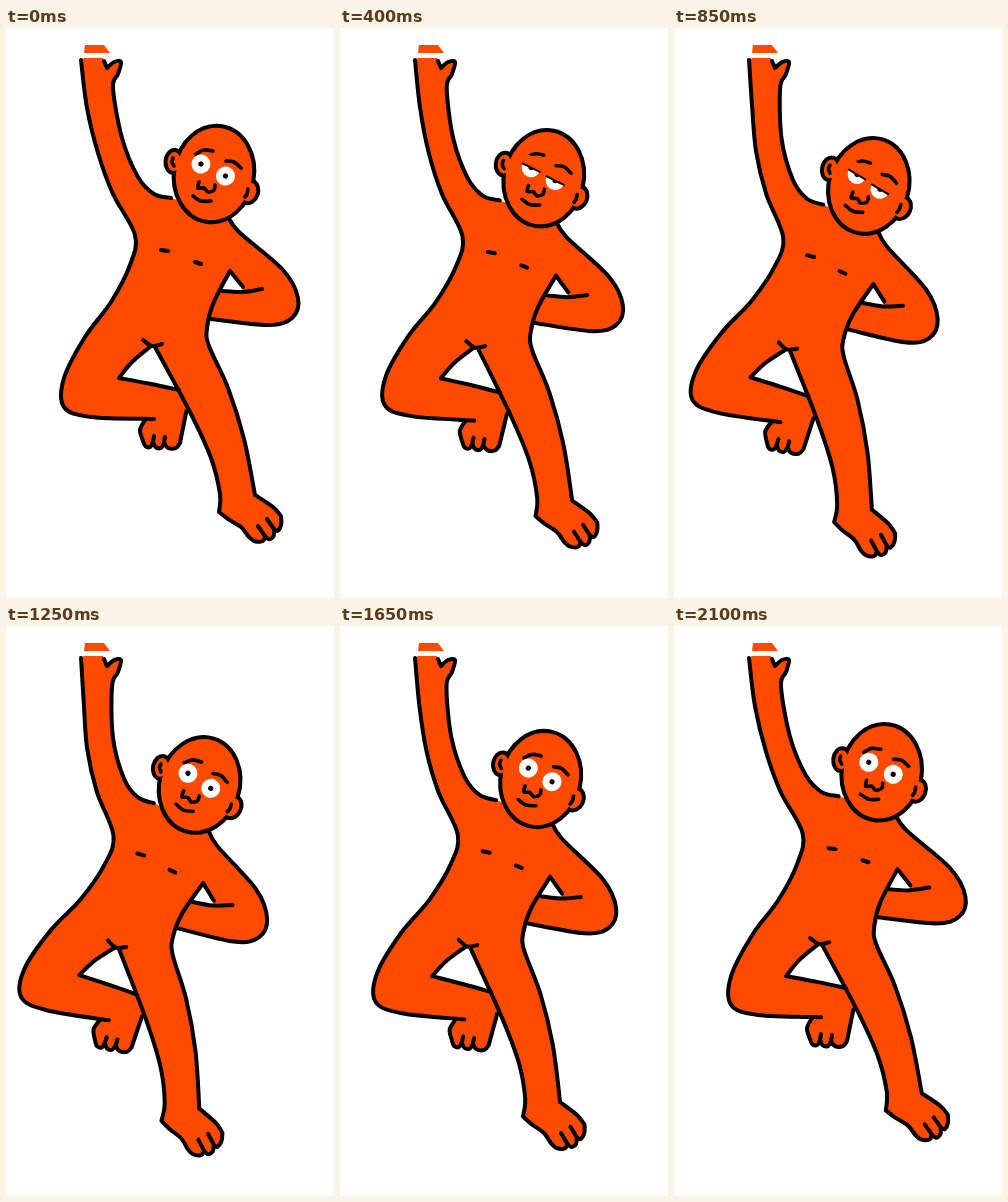
An HTML page with a canvas for the animation above (2.15 s loop, 328 by 570 pixels).

```html
<!DOCTYPE html>
<html lang="en">
<head>
<meta charset="utf-8">
<title>Swinging figure</title>
<style>
html, body { margin: 0; width: 100%; height: 100%; overflow: hidden; background: #fff; }
canvas { display: block; width: 328px; height: 570px; }
</style>
</head>
<body>
<canvas id="stage" width="328" height="570"></canvas>
<script>
const ctx = document.getElementById("stage").getContext("2d");
const ORANGE = "#ff4a00", INK = "#000";
const LOOP = 2150, STEP = 50, SWING = 2200;
const PIVOT = { x: 100, y: 40 }, MAX_ANGLE = 0.134;
const TAU = Math.PI * 2;

let angle = 0;

const ramp = (v, from, to) => Math.max(0, Math.min(1, (v - from) / (to - from)));

// The body hangs from the hand: full rotation below the elbow, none at the wrist.
function swing([x, y]) {
  const a = angle * ramp(y, 30, 110);
  const dx = x - PIVOT.x, dy = y - PIVOT.y, c = Math.cos(a), s = Math.sin(a);
  return [PIVOT.x + dx * c - dy * s, PIVOT.y + dx * s + dy * c];
}

// Smooth curve through the points, appended to the current path.
function curve(pts, join) {
  const at = i => pts[Math.max(0, Math.min(pts.length - 1, i))];
  if (join) ctx.lineTo(...pts[0]); else ctx.moveTo(...pts[0]);
  for (let i = 0; i < pts.length - 1; i++) {
    const a = at(i - 1), b = at(i), c = at(i + 1), d = at(i + 2);
    ctx.bezierCurveTo(b[0] + (c[0] - a[0]) / 6, b[1] + (c[1] - a[1]) / 6,
      c[0] - (d[0] - b[0]) / 6, c[1] - (d[1] - b[1]) / 6, c[0], c[1]);
  }
}

function fill(...parts) {
  ctx.beginPath();
  parts.forEach((part, i) => curve(part.map(swing), i > 0));
  ctx.fillStyle = ORANGE;
  ctx.fill();
}

function ink(...parts) {
  ctx.beginPath();
  parts.forEach(part => curve(part.map(swing)));
  ctx.stroke();
}

const back = pts => pts.slice().reverse();
const add = (p, v) => [p[0] + v[0], p[1] + v[1]];
const mix = (a, b, k) => [a[0] + (b[0] - a[0]) * k, a[1] + (b[1] - a[1]) * k];

// One rounded bump between each pair of joints, and a slit at each inner joint.
function toes(joints, bulge, slit) {
  const bumps = joints.slice(1).map((b, i) => {
    const a = joints[i];
    return [a, add(mix(a, b, 0.25), bulge), add(mix(a, b, 0.75), bulge), b];
  });
  const slits = joints.slice(1, -1).map(j => [j, add(j, slit)]);
  return { bumps, slits };
}

function drawArm() {
  const arm = [[221, 187], [233, 204], [277, 242], [292, 270], [286, 290], [262, 297], [205, 291]];
  const elbow = [[224, 243], [237, 259]];
  const forearm = [[216, 263], [236, 264], [256, 261]];
  fill(arm, [[198, 280]], forearm.slice(0, 2), back(elbow), [[195, 225]]);
  ink(arm, elbow, forearm);
}

function drawBackFoot() {
  const heel = [[139, 392], [134, 402], [137, 413]];
  const edge = [[174, 415], [177, 400], [181, 380]];
  const { bumps, slits } = toes([heel[2], [147, 414], [158, 415], edge[0]], [0, 5], [1, -6]);
  fill(heel, ...bumps, edge, [[173, 362], [145, 375]]);
  ink(heel, ...bumps, ...slits, edge);
}

function drawBody() {
  const side = [[75, 32], [81, 80], [92, 125], [107, 166], [129, 207], [124, 237], [105, 274],
    [79, 309], [58, 350], [58, 379], [85, 389], [148, 391]];
  const shin = [[173, 362], [145, 356], [113, 350]];
  const thigh = [[113, 350], [126, 334], [145, 318]];
  const inner = [[149, 319], [184, 384], [205, 430], [214, 466], [213, 484]];
  const sole = [[213, 484], [222, 491], [235, 499], [242, 508]];
  const instep = [[275, 488], [267, 479], [249, 467]];
  const outer = [[249, 467], [238, 411], [222, 360], [203, 318], [201, 300], [207, 276], [224, 243]];
  const reach = [[165, 170], [148, 166], [132, 149], [116, 110], [107, 60], [112, 46],
    [115, 34], [108, 34], [101, 40]];
  const { bumps, slits } = toes([sole[3], [259, 508], [268, 501], instep[0]], [2, 5], [-7, -10]);

  fill(side, [[181, 381]], shin, thigh, inner, sole, ...bumps, instep, outer,
    [[221, 187]], reach, [[97, 30], [78, 30]]);
  ink(side, shin, thigh, inner, sole, ...bumps, ...slits, instep, outer, reach,
    [[98, 33], [101, 40]], [[137, 312], [146, 318], [156, 316]],
    [[155, 222], [162, 223]], [[189, 234], [195, 236]]);
}

function disc(x, y, rx, ry, tilt, color) {
  ctx.beginPath();
  ctx.ellipse(x, y, rx, ry, tilt, 0, TAU);
  ctx.fillStyle = color;
  ctx.fill();
}

function line(...pts) {
  ctx.beginPath();
  curve(pts);
  ctx.stroke();
}

function eye(x, y, lid) {
  const r = 9.5;
  ctx.save();
  ctx.translate(x, y);
  ctx.rotate(0.42);
  if (lid >= 1) {
    ctx.beginPath();
    ctx.arc(0, 0, 8.5, 0.15, Math.PI - 0.15);
    ctx.stroke();
  } else {
    disc(0, 0, r, r, 0, "#fff");
    disc(0, 0, 2.6, 2.6, 0, INK);
    if (lid > 0) {
      const edge = r * (2 * lid - 1);
      ctx.fillStyle = ORANGE;
      ctx.fillRect(-r - 1, -r - 1, 2 * r + 2, edge + r + 1);
      ctx.lineWidth = 2;
      line([-r, edge], [r, edge]);
    }
  }
  ctx.restore();
}

function drawHead(lid) {
  const skull = [208, 146, 40, 48.5, 0.17];
  const ears = [[168, 133.5, 8.5, 11.5, 0.1], [243, 164, 9, 11.5, 0.35]];
  ctx.save();
  ctx.translate(PIVOT.x, PIVOT.y);
  ctx.rotate(angle);
  ctx.translate(-PIVOT.x, -PIVOT.y);

  // Outlines first, then plain fills on top, so the ears open into the head.
  for (const shape of [skull, ...ears]) {
    disc(...shape, INK);
    ctx.stroke();
  }
  for (const [x, y, rx, ry, tilt] of [skull, ...ears]) disc(x, y, rx - 2, ry - 2, tilt, ORANGE);

  ctx.lineWidth = 3.6;
  line([167, 130], [166, 134], [168, 138]);
  line([242, 161], [241, 166], [239, 169]);
  line([190, 126], [198, 122], [207, 123]);
  line([220, 133], [228, 134], [235, 140]);
  line([193, 154], [192, 160], [198, 160], [202, 164], [208, 162], [209, 157]);
  line([187, 168], [195, 173], [205, 173]);
  eye(195, 136, lid);
  eye(219.5, 148, lid);
  ctx.restore();
}

function draw(time) {
  const t = Math.floor(time % LOOP / STEP) * STEP;
  angle = MAX_ANGLE * (1 - Math.cos(t / SWING * TAU)) / 2;
  const lid = ramp(t, 300, 500) - ramp(t, 750, 950);

  ctx.fillStyle = "#fff";
  ctx.fillRect(0, 0, 328, 570);
  ctx.strokeStyle = INK;
  ctx.lineWidth = 4;
  ctx.lineCap = ctx.lineJoin = "round";

  drawArm();
  drawBackFoot();
  drawBody();
  fill([[79, 17]], [[98, 17]], [[104, 25]], [[78, 25]]);
  drawHead(lid);
}

function tick() {
  draw(performance.now());
  requestAnimationFrame(tick);
}
tick();
</script>
</body>
</html>
```
